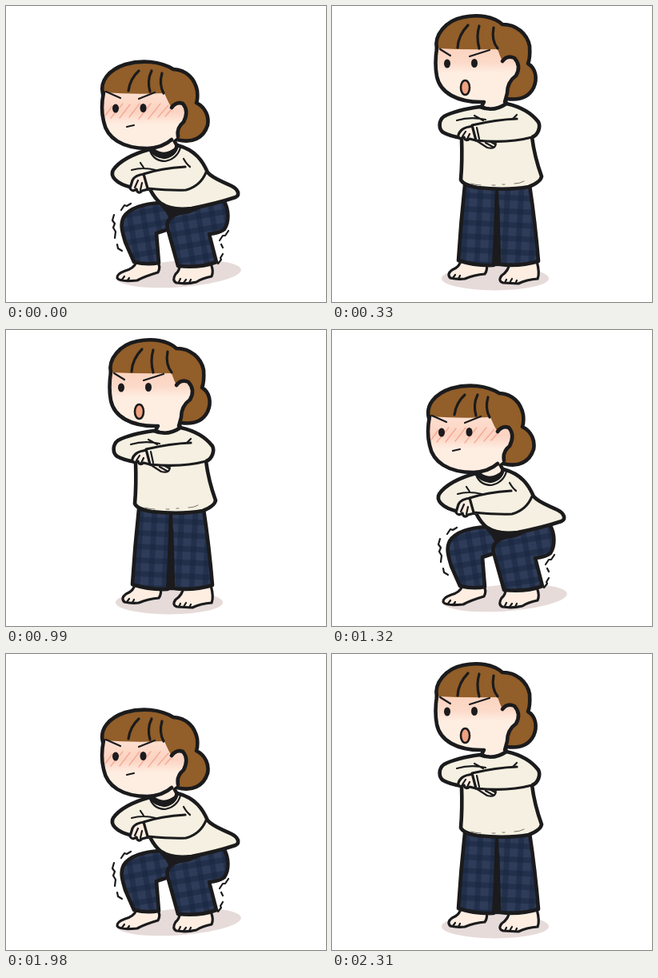
An HTML page for the animation above (2.64 s loop, 400 by 370 pixels).

```html
<!DOCTYPE html>
<html lang="en">
<head>
<meta charset="utf-8">
<title>Squats</title>
<style>
html, body { margin: 0; width: 100%; height: 100%; overflow: hidden; background: #fff; }
svg { display: block; width: 400px; height: 370px; }
path { fill: none; stroke-linecap: round; stroke-linejoin: round; }
.ink { stroke: #1b1b1d; stroke-width: 4.6; }
.mid { stroke: #1b1b1d; stroke-width: 3.2; }
.thin { stroke: #1b1b1d; stroke-width: 2.2; }
.hair { fill: #925e29; }
.skin { fill: #feeee2; }
.shirt { fill: #f5f0e1; }
.black { fill: #1b1b1d; }
.shadow { fill: #e6dbd9; }
.stripes { stroke: #f4a993; stroke-width: 1.3; }
.hem { stroke: #77736a; stroke-width: 1; }
.legs { fill: url(#plaid); }
.bent { fill: url(#plaidBent); }
.angry { fill: url(#anger); }
.blushing { fill: url(#blush); }
.base { fill: #2f3c59; }
.check { fill: #18243e; opacity: .5; }
</style>
</head>
<body>
<svg viewBox="0 0 400 370">
  <defs>
    <pattern id="plaid" width="17" height="17" patternUnits="userSpaceOnUse" patternTransform="translate(165 233) rotate(3)">
      <path class="base" d="M0 0h17v17H0z"/>
      <path class="check" d="M0 0h7v17H0z"/>
      <path class="check" d="M0 0h17v7H0z"/>
    </pattern>
    <pattern id="plaidBent" href="#plaid" patternTransform="translate(150 258) rotate(-10)"/>
    <linearGradient id="anger" x2="0" y2="1">
      <stop stop-color="#fcd4c0"/>
      <stop offset=".25" stop-color="#fcd9c8"/>
      <stop offset=".45" stop-color="#feeee2"/>
    </linearGradient>
    <linearGradient id="blush" x2="0" y2="1">
      <stop stop-color="#fddfd0"/>
      <stop offset=".35" stop-color="#fcd3c2"/>
      <stop offset=".58" stop-color="#feeee2"/>
    </linearGradient>
  </defs>

  <g id="squat">
    <ellipse class="shadow" cx="216" cy="335" rx="78" ry="16.5" transform="rotate(-4 216 335)"/>

    <!-- feet -->
    <path class="mid skin" d="M163 320Q160 328 149 331Q138 335 139 340Q142 345 164 343Q173 338 190 333Q194 326 189 319Z"/>
    <path class="mid skin" d="M217 324Q217 331 212 335Q207 343 213 346Q226 348 238 345Q246 340 257 338Q260 332 256 322Z"/>
    <path class="thin" d="M145 342l3-4M151 344l3-4M216 345l2-4M222 346l3-4M229 346l2-4"/>

    <!-- trousers -->
    <path class="ink bent" d="M192 246C174 247 154 252 147 264C142 274 146 284 149 295L160 320Q177 324 191 321L188 284L206 278L212 252Z"/>
    <path class="ink bent" d="M272 243C279 255 279 270 273 279Q267 284 254 285L263 320Q242 328 215 325C210 307 206 293 202 278C199 267 208 259 229 257L248 249Z"/>
    <path class="black" d="M189 246Q202 258 204 267Q213 258 232 256L251 249Z"/>

    <!-- neck and shirt -->
    <path class="ink skin" d="M189 174L183 179Q197 192 215 177L209 166Z"/>
    <path class="ink shirt" d="M180 179C162 184 143 192 134 205C130 212 136 222 158 227L180 229Q186 241 194 247Q207 256 232 253Q263 247 287 239C293 236 290 229 282 225C270 219 259 216 252 208C246 194 237 180 214 174Q211 187 198 189Q186 187 180 179Z"/>
    <path class="thin" d="M180 181Q185 194 199 194Q214 191 218 177"/>
    <path class="mid skin" d="M174 210Q161 211 158 218L155 228Q158 233 163 229Q165 236 170 231L178 229Z"/>
    <path class="thin" d="M161 227l4-9M168 230l2-9"/>
    <path class="shirt" d="M172 210L176 229Q214 235 240 225L249 208L223 201Q193 203 172 210Z"/>
    <path class="mid" d="M224 201Q193 203 172 210L177 228Q208 231 225 230Q243 225 250 208"/>
    <path class="thin" d="M157 205Q171 201 187 205M168 196l4 6M222 191q4 7 8 10"/>

    <!-- head -->
    <path class="ink hair" d="M121 110C117 94 128 80 149 73C170 67 193 69 209 79C226 80 236 91 239 106Q240 116 238 121C250 127 254 139 252 149C247 165 233 172 214 167L195 166Z"/>
    <path class="blushing" d="M122 108Q160 111 198 109Q203 121 207 127Q213 119 221 122Q229 131 222 145Q213 152 215 163Q202 176 177 178C145 178 126 165 122 144Q118 128 122 108Z"/>
    <path class="stripes" d="M124 137l9-12M131 140l15-18M142 140l13-17M154 139l13-17M166 141l15-19M178 141l15-19M190 139l13-15M199 138l8-9"/>
    <path class="ink" d="M122 108Q118 128 122 144C126 165 145 178 177 178Q196 177 207 167M207 127Q213 119 221 122Q229 131 222 145Q213 152 215 163"/>
    <path class="mid" d="M153 106Q155 91 166 81M180 107Q176 93 182 81M197 109Q191 98 195 84"/>
    <path class="thin" d="M125 107l18 8M166 116l20-8M151 151l9-2"/>
    <ellipse class="black" cx="137" cy="128" rx="4" ry="5.5"/>
    <ellipse class="black" cx="171.5" cy="127.5" rx="4" ry="5.5"/>

    <!-- trembling -->
    <path class="thin" d="M156 247l-5 3-3-1-4 6M135 261l-2 7 3 4-2 5 3 5-1 8M139 298l1 5 5 3M278 281l-4 6-3 0-4 6M269 298l2 4M271 310l-3 5 1 2-4 5"/>
  </g>

  <g id="stand">
    <ellipse class="shadow" cx="204" cy="340.5" rx="67" ry="15"/>

    <!-- feet -->
    <path class="mid skin" d="M161 318Q160 326 150 330Q143 335 148 340Q157 342 166 341Q178 336 191 335Q195 330 193 319Z"/>
    <path class="mid skin" d="M222 321Q221 331 212 337Q207 344 214 346L233 347Q243 342 257 341Q260 334 256 319Z"/>
    <path class="thin" d="M151 340l3-4M158 341l2-4M216 346l2-4M222 346l3-5M229 347l2-4"/>

    <!-- trousers -->
    <path class="ink legs" d="M166 224Q161 270 158 318Q179 325 202 324L207 250L209 323Q235 326 258 319Q254 270 247 224Z"/>
    <path class="ink black" d="M206 232L203 323L208 323Z"/>

    <!-- neck and shirt -->
    <path class="ink skin" d="M191 117L187 126Q201 134 218 123L215 108Z"/>
    <path class="ink shirt" d="M185 126Q155 130 140 138C133 143 133 154 139 158Q148 163 162 165Q163 194 161 217Q164 224 182 227Q218 231 246 226Q261 220 262 213Q253 188 250 164C258 161 261 151 258 145Q245 128 218 122Q202 133 185 126Z"/>
    <path class="thin skin" d="M180 168L194 177Q202 179 204 175Q206 172 203 169Z"/>
    <path class="thin" d="M192 171l9 5M197 169l7 4"/>
    <path class="mid skin" d="M178 150Q166 151 162 155Q157 160 158 164Q161 167 165 164Q167 170 172 166L180 168Z"/>
    <path class="thin" d="M163 163l4-6M169 166l3-6"/>
    <path class="shirt" d="M175 149Q204 142 231 141L252 147L249 163Q217 172 180 169Z"/>
    <path class="mid" d="M231 141Q205 142 175 149L180 168Q220 172 250 164"/>
    <path class="thin" d="M181 152l3 14M156 143Q173 138 192 142M178 137l11 6M231 136l-5 5"/>
    <path class="hem" d="M174 222q6 2 12 2M200 224h4M213 223h3M228 222q7 0 12-3"/>

    <!-- head -->
    <path class="ink hair" d="M131 54C127 36 143 18 164 14C183 10 202 13 213 23C231 23 244 35 247 50Q248 65 245 72C255 78 257 91 252 102C246 114 234 118 219 116L200 112Z"/>
    <path class="angry" d="M131 53Q170 55 207 54Q210 63 213 69Q219 61 228 65Q237 76 230 88Q219 95 219 109L215 120L193 122Q156 123 139 104Q133 99 131 88Q128 72 131 53Z"/>
    <path class="ink" d="M131 53Q128 72 131 88C135 108 156 121 190 120M213 69Q219 61 228 65Q237 75 230 87Q219 95 219 109L216 120"/>
    <path class="mid" d="M157 52Q158 36 170 24M184 53Q180 38 184 25M207 53Q199 43 202 27"/>
    <path class="thin" d="M135 54l13 8M172 63l25-8"/>
    <ellipse class="black" cx="144" cy="72" rx="4" ry="5.5"/>
    <ellipse class="black" cx="178" cy="71.5" rx="4" ry="5.5"/>
    <ellipse cx="166.5" cy="102" rx="5.5" ry="9" fill="#f0a17f" stroke="#1b1b1d" stroke-width="2.6"/>
  </g>
</svg>
<script>
const squat = document.getElementById('squat');
const stand = document.getElementById('stand');
const HOLD = 330;

function draw() {
  const up = Math.floor(performance.now() / HOLD) % 2 === 1;
  squat.style.display = up ? 'none' : '';
  stand.style.display = up ? '' : 'none';
  requestAnimationFrame(draw);
}
draw();
</script>
</body>
</html>
```
